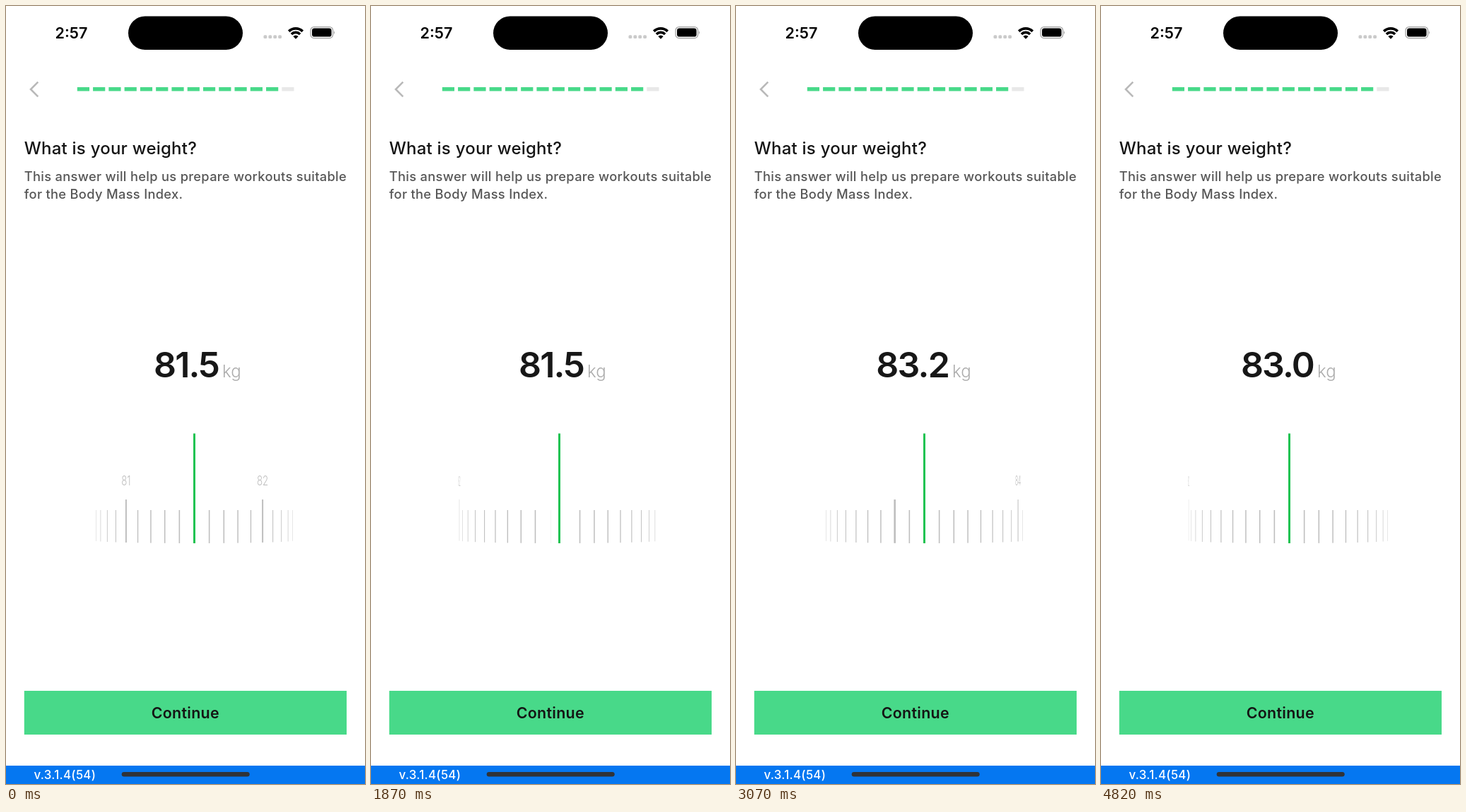
Animation of 508 by 1102 pixels, one loop 4900 ms. Source, as an HTML page:

```html
<!DOCTYPE html>
<html lang="en">
<head>
<meta charset="utf-8">
<title>Weight picker</title>
<style>
  html, body { margin: 0; width: 100%; height: 100%; overflow: hidden; background: #fff; }
  svg { display: block; width: 100vw; height: 100vh; }
  text { font-family: Inter, "Open Sans", sans-serif; white-space: pre; }
  .clock { font-size: 21.5px; font-weight: 600; }
  .title { font-size: 24px; font-weight: 500; letter-spacing: .22px; fill: #141414; }
  .hint { font-size: 18.3px; font-weight: 500; letter-spacing: .31px; fill: #565656; }
  .value { font-size: 50px; font-weight: 600; letter-spacing: -1.8px; fill: #171717; text-anchor: end; }
  .unit { font-size: 24px; font-weight: 300; fill: #acacac; }
  .button { font-size: 21.4px; font-weight: 600; letter-spacing: .3px; fill: #141414; text-anchor: middle; }
  .version { font-size: 16.9px; font-weight: 500; letter-spacing: .3px; fill: #fff; }
  .label { font-size: 18px; font-weight: 300; text-anchor: middle; }
</style>
</head>
<body>
<svg viewBox="0 0 508 1102">
  <defs><clipPath id="band"><rect x="254.5" y="600" width="24" height="170"/></clipPath></defs>

  <text class="clock" x="69.5" y="46">2:57</text>
  <rect x="173" y="14.5" width="162" height="47.5" rx="23.75"/>
  <g id="signal"></g>
  <g fill="none" stroke="#000" stroke-width="3.6">
    <path d="M400.2 35.9A14 14 0 0 1 419.8 35.9"/>
    <path d="M403.9 39.9A8.6 8.6 0 0 1 416.1 39.9"/>
  </g>
  <path d="M410 46.7L406.3 42.9A5.3 5.3 0 0 1 413.7 42.9Z"/>
  <rect x="431" y="29.6" width="31.6" height="16" rx="5" fill="none" stroke="#a2a2a2" stroke-width="1.3"/>
  <rect x="433" y="31.6" width="27.6" height="12" rx="3.4"/>
  <path d="M464 35.2Q466.2 37.6 464 40Z" fill="#a2a2a2"/>

  <path d="M45.3 107.7L35 118L45.3 128.3" fill="none" stroke="#b9b9b9" stroke-width="2.6"/>
  <g id="progress"></g>

  <text class="title" x="25.8" y="210">What is your weight?</text>
  <text class="hint" x="25.8" y="247.5">This answer will help us prepare workouts suitable</text>
  <text class="hint" x="25.8" y="272.5">for the Body Mass Index.</text>

  <text class="value" id="value" x="301" y="526">81.5</text>
  <text class="unit" x="306" y="526">kg</text>

  <g id="wheel"></g>
  <rect x="265" y="605.5" width="3" height="155.5" fill="#20c352"/>

  <rect x="25.8" y="970" width="456.2" height="62" fill="#48d989"/>
  <text class="button" x="253.8" y="1008.5">Continue</text>
  <rect y="1076" width="508" height="26" fill="#0577f1"/>
  <text class="version" x="39.5" y="1095">v.3.1.4(54)</text>
  <rect x="163.7" y="1085" width="181" height="6.6" rx="3.3" fill="#303338"/>
</svg>
<script>
const LOOP = 4900, STEP = 200 / 3;
const CX = 266.5, RADIUS = 143, ANGLE = 8.5 * Math.PI / 180;
const DIM = '#bebebe', DARK = '#777';

// Distance left to the resting value, in kg, while the wheel coasts.
const FLING = [[1070, 1.395], [1530, .524], [2270, .094], [2800, .01], [3070, .001]];
const NUDGE = [[4200, .061], [4820, .001]];

const byId = id => document.getElementById(id);
const valueText = byId('value'), wheel = byId('wheel');

const rect = (x, y, w, h, fill, rx = 0) =>
  `<rect x="${x}" y="${y}" width="${w}" height="${h}" rx="${rx}" fill="${fill}"/>`;

byId('signal').innerHTML = [0, 1, 2, 3].map(i =>
  rect(364.5 + i * 6.9, 41.2, 4.8, 4.8, '#cacaca', 1.6)).join('');
byId('progress').innerHTML = Array.from({ length: 14 }, (_, i) =>
  rect(100.8 + i * 22.27, 115, 17.2, 5.5, i < 13 ? '#48d989' : '#e8e8e8')).join('');

// Friction-like decay through the given points.
function decay(keys, t) {
  const i = Math.max(1, keys.findIndex(k => t <= k[0]));
  const [t0, a] = keys[i - 1], [t1, b] = keys[i];
  return a * Math.pow(b / a, (t - t0) / (t1 - t0));
}

function scrollAt(t) {
  if (t < 1070) return 81.5;
  if (t < 3070) return 83.2 - decay(FLING, t);
  if (t < 4200) return 83.2;
  if (t < 4820) return 83 + decay(NUDGE, t);
  return 83;
}

const shownAt = t => t < 3070 ? '81.5' : t < 4820 ? '83.2' : '83.0';

// The wheel advances 15 times a second, on a 10 ms grid.
function stepTime(t) {
  if (t >= 4820) return 4820;
  const snap = k => Math.round(k * STEP / 10) * 10;
  let k = Math.ceil(t / STEP);
  while (k > 0 && snap(k) > t) k--;
  return snap(k);
}

function item(i, scroll) {
  const d = i - scroll * 10, turn = d * ANGLE, c = Math.cos(turn);
  const major = i % 10 === 0;
  // Short ticks vanish sooner on the left edge.
  if (d > 9.3 || d < (major ? -10.5 : -9.03)) return '';
  const inBand = Math.abs(d) < .7;
  if (inBand && d >= .3) return '';
  const x = CX + RADIUS * Math.sin(turn);
  const w = (major ? 2.7 : 1.6) * c, top = major ? 699 : 714;
  const fill = inBand ? DARK : DIM;
  let out = rect(x - w / 2, top, w, 761 - 4 * (1 - c) - top, fill);
  const labelled = inBand ? d < -.3 : d < -3 || d > 0;
  if (major && labelled) {
    out += `<text class="label" fill="${fill}" transform="translate(${x} ${678 + 2 * (1 - c)}) scale(${c} 1)">${i / 10}</text>`;
  }
  return inBand ? `<g clip-path="url(#band)">${out}</g>` : out;
}

function drawWheel(scroll) {
  const mid = Math.round(scroll * 10);
  let out = '';
  for (let i = mid - 11; i <= mid + 11; i++) out += item(i, scroll);
  wheel.innerHTML = out;
}

let last = -1;
function frame() {
  const t = stepTime(performance.now() % LOOP);
  if (t !== last) {
    last = t;
    valueText.textContent = shownAt(t);
    drawWheel(scrollAt(t));
  }
  requestAnimationFrame(frame);
}
frame();
</script>
</body>
</html>
```
